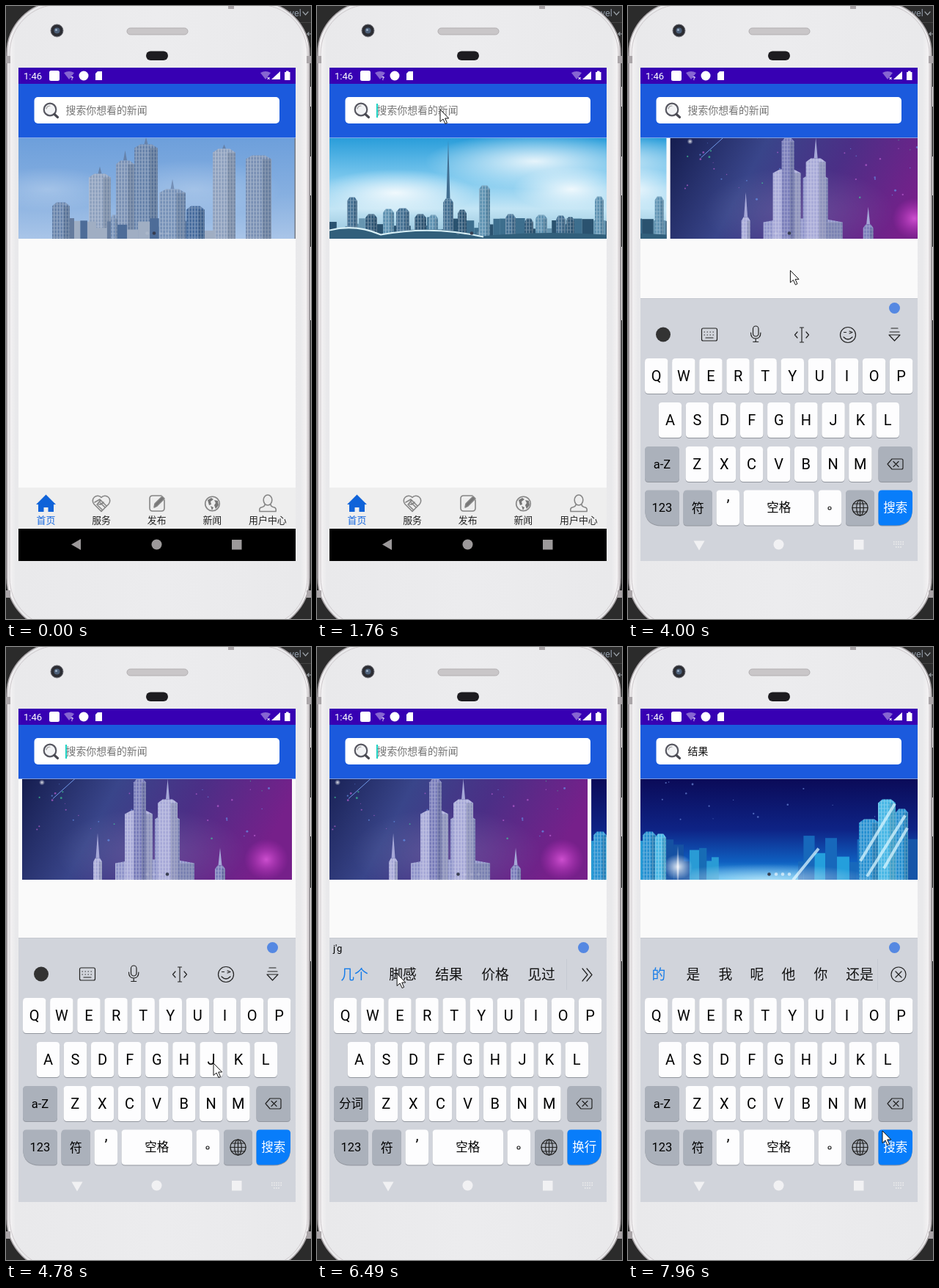
An HTML page that plays this animation: 416 by 835 pixels, repeating every 8 s.

```html
<!DOCTYPE html>
<html lang="zh-CN">
<head>
<meta charset="utf-8">
<title>新闻搜索</title>
<style>
html, body { margin: 0; width: 100%; height: 100%; overflow: hidden; background: #2b2b2b; }
svg { display: block; width: 416px; height: 835px; }
text { font-family: Roboto, "Noto Sans CJK SC", "Noto Sans CJK", sans-serif; text-anchor: middle; white-space: pre; }
.start { text-anchor: start; }
.line { fill: none; stroke: #222; stroke-width: 1.2; stroke-linecap: round; stroke-linejoin: round; }
.tab { fill: none; stroke: #858585; stroke-width: 1.6; stroke-linejoin: round; stroke-linecap: round; }
</style>
</head>
<body>
<svg viewBox="0 0 416 835" xmlns="http://www.w3.org/2000/svg">
<defs>
  <clipPath id="screen"><path d="M17 84h378v672H17z"/></clipPath>
  <clipPath id="banner"><path d="M17 179.500h378v137.500H17z"/></clipPath>
  <clipPath id="page"><path d="M0 0h378v138H0z"/></clipPath>
  <linearGradient id="metal"><stop offset="0" stop-color="#c9c4c7"/><stop offset=".008" stop-color="#f5f3f4"/><stop offset=".03" stop-color="#e9e9eb"/><stop offset=".5" stop-color="#ececee"/><stop offset=".97" stop-color="#e9e9eb"/><stop offset=".992" stop-color="#f5f3f4"/><stop offset="1" stop-color="#bdb8bb"/></linearGradient>
  <linearGradient id="sky0" x2="0" y2="1"><stop stop-color="#6d9fdb"/><stop offset=".55" stop-color="#86afe0"/><stop offset="1" stop-color="#a9c5e8"/></linearGradient>
  <linearGradient id="sky1" x2="0" y2="1"><stop stop-color="#299dda"/><stop offset=".4" stop-color="#7cc8ee"/><stop offset=".7" stop-color="#c3e5f5"/><stop offset="1" stop-color="#8fbfd8"/></linearGradient>
  <linearGradient id="sky2" x2="1" y2=".2"><stop stop-color="#151d4f"/><stop offset=".35" stop-color="#39458a"/><stop offset=".65" stop-color="#4b2f86"/><stop offset="1" stop-color="#76208a"/></linearGradient>
  <linearGradient id="sky3" x2="0" y2="1"><stop stop-color="#0b0b58"/><stop offset=".5" stop-color="#0e2385"/><stop offset=".82" stop-color="#0f5fc0"/><stop offset="1" stop-color="#39b4ef"/></linearGradient>
  <radialGradient id="white"><stop stop-color="#fff" stop-opacity=".85"/><stop offset="1" stop-color="#fff" stop-opacity="0"/></radialGradient>
  <radialGradient id="pink"><stop stop-color="#e25be0" stop-opacity=".8"/><stop offset="1" stop-color="#c030c0" stop-opacity="0"/></radialGradient>
  <pattern id="panes" width="4" height="5" patternUnits="userSpaceOnUse"><path d="M0 0h1.300v5H0zM1 0h3v1H1z" fill="#fff" opacity=".3"/></pattern>
</defs>

<path fill="#2b2b2b" d="M0 0h416v835H0z"/>
<path d="M330 22.500h86" stroke="#444"/>
<text x="380" y="14" class="start" font-size="12.500" fill="#8f9aa8">ovel</text>
<path class="line" d="M405 8l3.500 4 3.500-4M411 38h5m-5 0l2-2m-2 2l2 2" style="stroke:#9aa0a6"/>
<rect x="1" y="-6" width="413" height="856" rx="71" fill="url(#metal)" stroke="#a8a3a6" stroke-width="1.500"/>
<rect x="5" y="-2" width="406" height="848" rx="67" fill="none" stroke="#cdc8cb"/>
<path d="M0 68h6v10H0zM410 68h6v10h-6zM0 796h6v10H0zM410 796h6v10h-6zM303 0h8v4h-8z" fill="#aaa5a8"/>
<path d="M415.500 110v27m0 68v53m0 70v100" stroke="#e4e0e2"/>
<circle cx="69.500" cy="33.500" r="8.500" fill="#2c2d33" stroke="#74747b"/>
<circle cx="69.500" cy="33.500" r="4" fill="#4d6079"/><circle cx="68.500" cy="32.500" r="1.500" fill="#9db0c6"/>
<rect x="165" y="30" width="83" height="9" rx="4.500" fill="#c9c6c8" stroke="#b2afb1"/>
<rect x="191" y="61.500" width="30" height="12.500" rx="6.200" fill="#1d1c20"/>

<g clip-path="url(#screen)">
  <path fill="#fafafa" d="M17 84h378v672H17z"/>
  <path fill="#3700b3" d="M17 84h378v22H17z"/>
  <path fill="#1b5add" d="M17 106h378v73.500H17z"/>
  <g fill="#fff">
    <text x="24" y="100" class="start" font-size="13">1:46</text>
    <rect x="59" y="88" width="14" height="14" rx="2.500"/>
    <path d="M79 91q7-4 14 0l-7 9z" opacity=".4"/><text x="90" y="101" font-size="8" font-weight="700">?</text>
    <circle cx="106" cy="95" r="6.500"/>
    <path d="M125 89h6v12h-9v-9z"/>
    <path d="M347 91q7-4 14 0l-7 9z" opacity=".4"/><text x="358" y="101" font-size="8" font-weight="700">×</text>
    <path d="M374 89v11h-12z"/><path d="M380 90h2v-1.500h3.500V90h2v11H380z"/>
  </g>
  <rect x="38.500" y="124" width="334.500" height="36" rx="5" fill="#fff"/>
  <circle cx="60" cy="141" r="8.300" fill="#f2f3f5" stroke="#585861" stroke-width="2.200"/>
  <path d="M55 140q1-4 5-4" class="line" style="stroke:#999"/><path d="M66 147.500l4.500 4" stroke="#484850" stroke-width="3.200" stroke-linecap="round"/>
  <text id="query" x="81.500" y="147" class="start" font-size="13.900"></text>
  <path id="caret" d="M82 133v19" stroke="#03cdbb" stroke-width="1.800"/>
  <g clip-path="url(#banner)"><g id="track"></g><g id="dots"></g></g>

  <path fill="#eee" d="M17 656h378v56H17z"/>
  <path fill="#0f63d9" d="M41 679l13.500-13.500L68 679h-3v10h-7.500v-6h-6v6H44v-10z"/>
  <g class="tab">
    <path d="M130 688.500l-10-10a6 6 0 0 1 10-9 6 6 0 0 1 10 9zM121 676l7-4 9 9m-13-2l7 7m-3-10l7 7m-6-10l-4 5 4 1 4-3"/>
    <path d="M212 667h-12q-4 0-4 4v13q0 4 4 4h12q4 0 4-4v-11"/>
    <path d="M202 683l1-5 10-10 3 3-10 10z" fill="#777"/>
    <circle cx="281.500" cy="678" r="9.800"/>
    <path d="M275 673l5-3 3 2-4 3 1 4-3 1zM284 673l5 1 1 6-4 5-2-5 2-3zM279 681l4 2-2 4z" fill="#777" stroke="none"/>
    <ellipse cx="357" cy="673" rx="5.800" ry="7"/><path d="M353 679q0 3-5 4-3 1-2 5.500h22q1-4.500-2-5.500-5-1-5-4"/>
  </g>
  <g id="tabs" font-size="12.900"></g>
  <path d="M17 712h378v44H17z"/>

  <g id="keyboard">
    <path fill="#d1d4db" d="M17 396h378v380H17z"/>
    <path stroke="#c5c8cf" d="M17 396.500h378"/>
    <circle cx="363.500" cy="409.500" r="7.500" fill="#5588e2"/>
    <text id="pinyin" x="22" y="415" class="start" font-size="13"></text>
    <g id="tools" class="line">
      <circle cx="48" cy="445.500" r="10" fill="#333" stroke="none"/>
      <rect x="100.500" y="437" width="21" height="17" rx="2"/><path d="M104 442h14m-14 4h14" stroke-dasharray=".5 3.500"/><path d="M106 450h10"/>
      <rect x="170.500" y="434" width="7.500" height="14" rx="3.700"/><path d="M167.500 443q0 8 6.700 8t6.700-8m-6.700 8v4.500m-3.500 0h7"/>
      <path d="M237 436v20m-2.500-20h5m-5 20h5M231 442l-3.500 4 3.500 4m12-8l3.500 4-3.500 4"/>
      <circle cx="300" cy="446" r="10.500"/><path d="M294 449q6 6 12 0m-11.500-6.500h3m4.500-1.500l4 1.500-4 1.500"/>
      <path d="M359 437h9m-11 5h13m-14 4h15l-7.500 8z"/>
    </g>
    <g id="words" font-size="18.800"></g>
    <path id="divider" d="M340.500 425v42" stroke="#c6cad2"/>
    <path id="more" class="line" d="M362 438l7 8.500-7 8.500m6-17l7 8.500-7 8.500"/>
    <path id="close" class="line" d="M365 442l8 8m0-8l-8 8M379 446a10 10 0 1 1-20 0a10 10 0 1 1 20 0"/>
    <g id="keys"></g>
    <path class="line" d="M354 622l6-7h13q2 0 2 2v10q0 2-2 2h-13zm8-3.500l7 7m0-7l-7 7"/>
    <g class="line" transform="translate(316.500 681.500)"><circle r="10.500"/><ellipse rx="4.800" ry="10.500"/><path d="M0-10.500v21M-10.500 0h21M-9-5.500h18M-9 5.500h18"/></g>
  </g>
  <g id="system" fill="#9c999a">
    <path id="back" d="M89 733.500l13-7.500v15z"/>
    <circle cx="205.500" cy="733.500" r="7"/><path d="M308 727h13.500v13.500H308z"/>
    <path id="ime" d="M362 730h15m-15 3h15m-12 4h9" stroke="#eee" stroke-width="1.600" stroke-dasharray="1.600 1.500"/>
  </g>
</g>
<path id="mouse" d="M0 0v16.500l4-3.500 3 6.500 2.500-1.200-2.800-6.300h5z" fill="#fff" stroke="#111"/>
</svg>
<script>
const LOOP = 8000, PAGE = 378;
const $ = id => document.getElementById(id);
const label = (x, y, size, text, fill = '#111') =>
  `<text x="${x}" y="${y}" font-size="${size}" fill="${fill}">${text}</text>`;
const rect = (x, y, w, h, fill, extra = '') =>
  `<rect x="${x}" y="${y}" width="${w}" height="${h}" fill="${fill}" ${extra}/>`;
const glow = (x, y, rx, ry, paint = 'white', opacity = 1) =>
  `<ellipse cx="${x}" cy="${y}" rx="${rx}" ry="${ry}" fill="url(#${paint})" opacity="${opacity}"/>`;

let seed = 7;
const random = () => (seed = seed * 16807 % 2147483647) / 2147483647;

// Each tower: left, width, top, spire height
const skyline = (towers, colors) => towers.map(([x, w, top, spire = 0], i) => {
  const d = `M${x} 138V${top + 5}l${w * .25}-5h${w * .5}l${w * .25} 5V138z`;
  const mast = spire ? `<path d="M${x + w / 2 - 2.5} ${top}l2.500-${spire} 2.500 ${spire}z" fill="${colors[0]}"/>` : '';
  return `${mast}<path d="${d}" fill="${colors[i % colors.length]}"/><path d="${d}" fill="url(#panes)"/>` +
    `<path d="M${x + w * .65} ${top + 5}h${w * .35}V138h-${w * .35}z" fill="#123" opacity=".16"/>`;
}).join('');

const lowRise = (from, to, height, colors) => {
  let out = '';
  for (let x = from; x < to;) {
    const w = 6 + random() * 11, h = height * (.35 + random() * .65);
    out += rect(x, 138 - h, w, h, colors[Math.floor(random() * colors.length)]);
    x += w;
  }
  return out;
};
const sparks = (count, height, colors) => Array.from({length: count}, () =>
  `<circle cx="${20 + random() * 330}" cy="${random() * height}" r="${.5 + random()}" fill="${colors[Math.floor(random() * colors.length)]}" opacity=".65"/>`).join('');

const photos = [
  () => rect(0, 0, 378, 138, 'url(#sky0)') + glow(40, 70, 90, 30, 'white', .3) + glow(240, 70, 120, 40, 'white', .3) +
    skyline([[46, 24, 88], [96, 30, 49, 10], [133, 25, 31, 14], [158, 32, 9, 10], [265, 31, 15, 6], [310, 35, 24]], ['#6682aa', '#8c9fbd', '#788fb3']) +
    lowRise(70, 265, 30, ['#657b9d', '#a0aec3', '#4d6c98']) +
    skyline([[192, 36, 70, 14], [229, 25, 93], [126, 9, 105]], ['#7590b7', '#456b9d']) +
    rect(376.5, 0, 1.5, 138, '#777c85'),
  () => rect(0, 0, 378, 138, 'url(#sky1)') + glow(280, 32, 150, 38) + glow(90, 75, 110, 32) + glow(330, 70, 80, 30) +
    lowRise(0, 378, 30, ['#3d6e8d', '#6796b1', '#2a526f']) +
    skyline([[24, 14, 81], [49, 16, 104], [73, 15, 97], [91, 18, 96], [116, 16, 104], [135, 13, 105], [155, 14, 83, 80], [175, 12, 98], [204, 15, 65],
      [240, 14, 104], [266, 12, 110], [281, 16, 105], [309, 13, 106], [323, 11, 108], [362, 12, 80]], ['#416e91', '#2e5878', '#5c91b1']) +
    '<path d="M0 138v-12q35-10 70 6 70-15 140 2 80-8 168-2v6z" fill="#315f7b"/><path d="M0 126q35-9 70 6 70-13 140 3" fill="none" stroke="#d9f1f8" stroke-width="2"/>',
  () => rect(5, 0, 368, 138, 'url(#sky2)') + glow(338, 110, 30, 28, 'pink') + glow(180, 100, 130, 60, 'white', .17) +
    sparks(45, 85, ['#44d49a', '#6695ef', '#bd62d5']) + '<path d="M47 27L77 0" stroke="#739bea"/>' + glow(32, 5, 4, 4) +
    skyline([[102, 12, 108, 34], [268, 14, 118, 24], [132, 108, 110], [145, 38, 43], [157, 17, 0], [186, 34, 50], [190, 27, 28, 28]], ['#a6a8d7', '#777bb9', '#8d92c9']),
  () => rect(0, 0, 378, 138, 'url(#sky3)') + sparks(16, 60, ['#7391e0']) +
    lowRise(0, 100, 65, ['#176cb5', '#299bd5', '#1551a2']) + lowRise(215, 378, 66, ['#1768bb', '#249fdc', '#1555a8']) +
    skyline([[3, 18, 72], [20, 15, 75], [298, 28, 55], [324, 24, 28], [348, 17, 41]], ['#258fd0', '#45b6e5']) +
    '<path d="M300 112l47-78M309 133l52-83M208 138l35-43M332 122l32-55" stroke="#d7f5ff" stroke-width="4" opacity=".75"/>' +
    glow(51, 120, 20, 17) + glow(51, 120, 2, 30) + glow(170, 138, 150, 22, 'white', .7),
];
$('track').innerHTML = photos.map((draw, i) => `<g transform="translate(${i * PAGE} 0)" clip-path="url(#page)">${draw()}</g>`).join('');
$('dots').innerHTML = [192.5, 202, 211, 220].map(x => `<circle cx="${x}" cy="309.500" r="2.300"/>`).join('');
$('tabs').innerHTML = ['首页', '服务', '发布', '新闻', '用户中心'].map((name, i) =>
  label(54.5 + i * 75.6, 705, 12.9, name, i ? '#222' : '#1769e0')).join('');

const GREY = '#abb1bb', STEP = 37.1;
const key = (x, y, w, text, {fill = '#fdfdfe', size = 20, color = '#000', id = '', shape} = {}) => {
  const d = shape || `M${x + 5} ${y}h${w - 10}q5 0 5 5v38q0 5-5 5h-${w - 10}q-5 0-5-5v-38q0-5 5-5z`;
  return `<path d="${d}" fill="#92969e" transform="translate(0 1)"/><path d="${d}" fill="${fill}"/>` +
    `<text ${id && `id="${id}"`} x="${x + w / 2}" y="${y + 24 + size * .36}" font-size="${size}" fill="${color}">${text}</text>`;
};
const row = (letters, x, y) => [...letters].map((c, i) => key(x + i * STEP, y, 31.5, c)).join('');
$('keys').innerHTML = row('QWERTYUIOP', 23, 478) + row('ASDFGHJKL', 41.7, 538) + row('ZXCVBNM', 78.5, 598) +
  key(23, 598, 47, 'a-Z', {fill: GREY, size: 16.5, id: 'shift'}) + key(341.5, 598, 46.5, '', {fill: GREY}) +
  key(23, 657.5, 47, '123', {fill: GREY, size: 16.5, shape: 'M28 657.500h37q5 0 5 5v38q0 5-5 5H46q-23 0-23-23v-20q0-5 5-5z'}) +
  key(75.5, 657.5, 39.5, '符', {fill: GREY, size: 17}) + key(120.5, 657.5, 31.5, '') + key(157.5, 657.5, 96.5, '空格', {size: 16.5}) +
  key(259.5, 657.5, 31.5, '') + key(297, 657.5, 39, '', {fill: GREY}) +
  key(341.5, 657.5, 46.5, '搜索', {fill: '#087dfa', size: 16.5, color: '#fff', id: 'enter',
    shape: 'M346.500 657.500h36.500q5 0 5 5v20q0 23-23 23h-18.500q-5 0-5-5v-38q0-5 5-5z'}) +
  label(136.5, 686, 22, '’') + '<circle cx="275" cy="682" r="2" class="line"/>';

// Input states: start, pinyin, candidates, their centres
const PAIRS = [51, 117, 180, 243, 306];
const INPUT = [
  [0, '', [], []],
  [5230, 'j', ['就', '家', '见', '加', '几'], PAIRS],
  [5520, "j'g", ['几个', '脚感', '结果', '价格', '见过'], PAIRS],
  [7590, '', ['的', '是', '我', '呢', '他', '你', '还是'], [42, 89, 133, 176, 219, 263, 316]],
];
const SLIDES = [310, 3360, 6370], SLIDE_MS = 800;
const BLINKS = [410, 910, 1410, 1910, 2430, 2910, 3410, 3910, 4410, 4910, 5410, 5860, 6300, 6840, 7340, 7600];
const POINTER = [
  [430, 250, 840], [760, 266, 700], [1130, 215, 290], [1450, 186, 171], [1590, 186, 171], [1750, 168, 141], [2440, 168, 141],
  [2530, 157, 134], [3070, 157, 134], [3230, 157, 167], [3500, 157, 167], [4480, 283, 545], [4750, 283, 567], [5160, 283, 567],
  [5400, 206, 567], [5500, 206, 567], [5850, 48, 472], [6080, 47, 443], [6250, 48, 443], [6340, 211, 445], [6480, 107, 445],
  [6850, 178, 447], [7260, 180, 450], [7410, 323, 576], [7640, 345, 655], [7900, 347, 659], [LOOP, 347, 659],
];
const clamp = v => Math.max(0, Math.min(1, v));
const ease = v => (1 - Math.cos(Math.PI * clamp(v))) / 2;
const show = (id, on) => $(id).style.display = on ? '' : 'none';

function movePointer(t) {
  show('mouse', t >= POINTER[0][0]);
  const next = Math.max(1, POINTER.findIndex(p => p[0] > t));
  const [a, b] = [POINTER[next - 1], POINTER[next]];
  const k = clamp((t - a[0]) / (b[0] - a[0]));
  $('mouse').setAttribute('transform', `translate(${a[1] + (b[1] - a[1]) * k} ${a[2] + (b[2] - a[2]) * k})`);
}

let stage = -1;
function setInput(next) {
  if (next === stage) return;
  stage = next;
  const [, pinyin, words, centres] = INPUT[stage];
  const composing = pinyin !== '', done = stage === 3;
  $('pinyin').textContent = pinyin;
  $('words').innerHTML = words.map((w, i) => label(centres[i], 453, 18.8, w, i ? '#111' : '#167ce9')).join('');
  $('shift').textContent = composing ? '分词' : 'a-Z';
  $('enter').textContent = composing ? '换行' : '搜索';
  $('query').textContent = done ? '结果' : '搜索你想看的新闻';
  $('query').setAttribute('fill', done ? '#111' : '#757575');
  show('tools', stage === 0);
  show('divider', stage > 0);
  show('more', composing);
  show('close', done);
}

function render(t) {
  const offset = SLIDES.reduce((sum, start) => sum + ease((t - start) / SLIDE_MS), 0);
  $('track').setAttribute('transform', `translate(${17 - offset * PAGE} 179.500)`);
  const active = (1 + SLIDES.filter(s => t >= s).length) % 4;
  [...$('dots').children].forEach((dot, i) => {
    dot.setAttribute('fill', i === active ? '#343a4c' : '#fff');
    dot.setAttribute('opacity', i === active ? .95 : offset > 2.5 ? .6 : .12);
  });
  show('caret', BLINKS.filter(b => t >= b).length % 2);
  setInput(INPUT.filter(s => t >= s[0]).length - 1);

  const rise = 1 - clamp((t - 3050) / 180);
  show('keyboard', t >= 3070);
  $('keyboard').setAttribute('transform', `translate(0 ${rise * rise * 360 + (t < 4230 ? 2 : 0)})`);
  $('system').setAttribute('fill', t < 3150 ? '#9c999a' : '#f1f1f3');
  $('back').setAttribute('transform', `rotate(${-90 * ease((t - 3390) / 250)} 97 733.500)`);
  show('ime', t >= 2880);
  movePointer(t);
}

const began = performance.now();
(function frame() {
  render((performance.now() - began) % LOOP);
  requestAnimationFrame(frame);
})();
</script>
</body>
</html>
```
